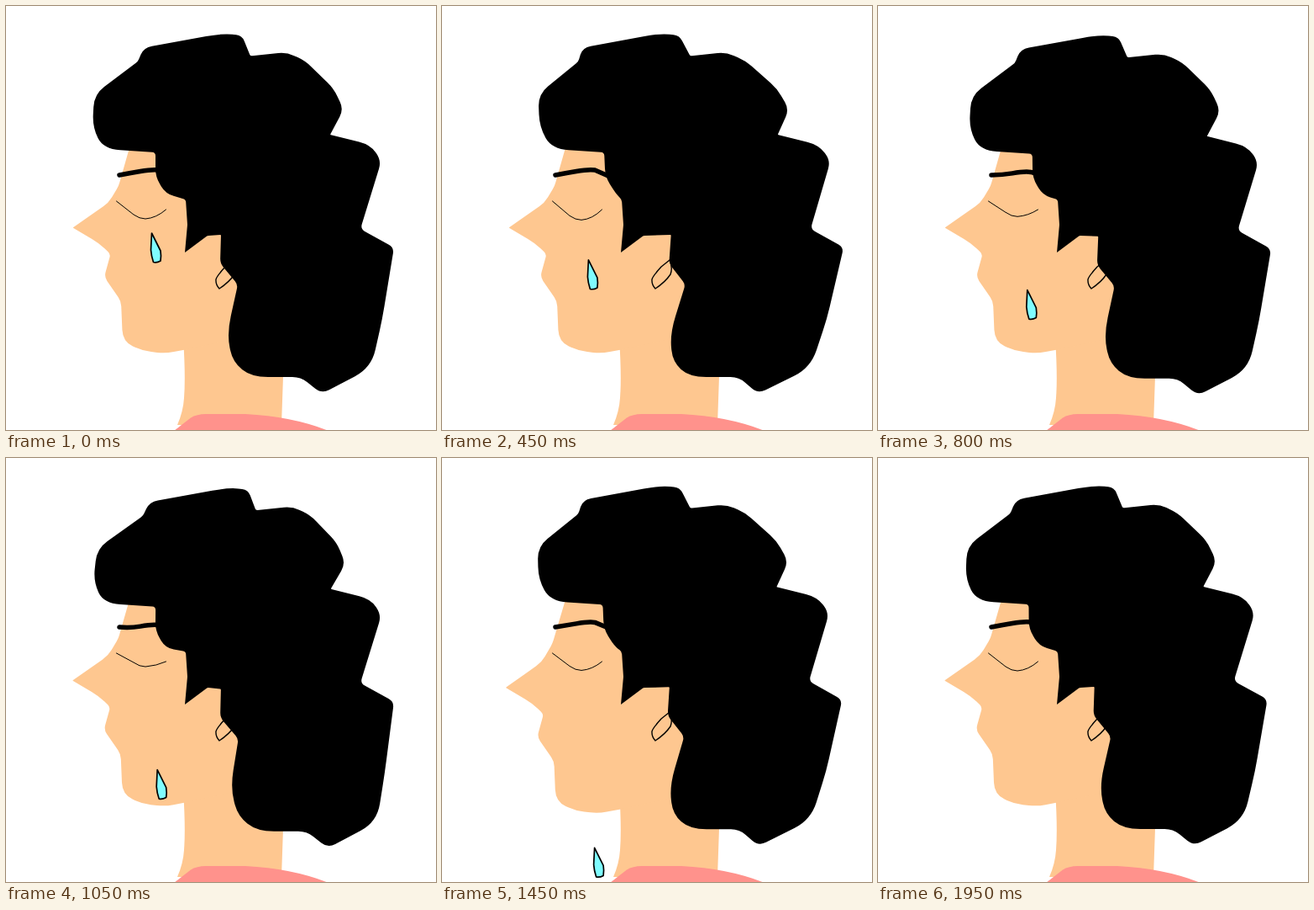
An HTML page for the animation above (2000 ms loop, 512 px wide and 504 px high).

```html
<!DOCTYPE html>
<html lang="en">
<head>
<meta charset="utf-8">
<title>Crying profile</title>
<style>
  html, body { margin: 0; width: 100%; height: 100%; overflow: hidden; background: #fff; }
  svg { display: block; width: 512px; height: 504px; }
  .skin { fill: #fec790; }
  .line { fill: none; stroke: #000; stroke-linejoin: round; stroke-linecap: round; }
</style>
</head>
<body>
<svg viewBox="0 0 512 504">
  <path class="skin" d="M211 395 Q214 440 212 466 Q211 482 204 498 H328 L330 440 V300 H240 Z"/>
  <path class="skin" id="face"/>
  <path fill="#ff928c" d="M200 505 L220 489.5 Q227 485 238 485 H285 Q342 488 384 505 Z"/>
  <path class="line" id="eye" stroke-width="1"/>
  <path class="line" id="brow" stroke-width="5.5"/>
  <path class="line" stroke-width="1.4" d="M271 302 L261 310 Q251 321 250 325 Q249.5 331 254 336 Q266 328 272 319 Q275 311 271 302 Z"/>
  <path id="tear" fill="#7ffcff" stroke="#000" stroke-width="1.7" stroke-linejoin="round"
    d="M0 1 L10.5 22 Q11.5 28 10.5 34 Q6 36.5 2 35.5 Q-0.5 28 -1 21 Z"/>
  <path id="hair"/>
</svg>
<script>
const LOOP = 2000, TICK = 50, KEY = 500, ROUND = 10;

// corners: x, y and, where it is not ROUND, the corner radius
const curls = [
  [190, 223], [178, 203], [178, 174, 4], [116, 170, 20], [103, 144, 15], [105, 105, 15],
  [157, 66, 3], [164, 49.5], [258, 32.5, 20], [281, 35, 7], [291, 59.5, 2],
  [334, 55], [356, 65], [390, 98], [402, 123], [386, 153, 1],
  [434, 165, 14], [447, 184], [422, 265, 6], [462, 287, 7],
  [448, 372, 15], [435, 430, 22], [376, 461], [351, 441],
  [292, 441, 20], [270, 423, 14], [263, 390, 22], [276, 331, 5], [255, 306, 6], [256, 272, 1]
];
const sideburn = [[240, 273, 1], [213, 293, 0], [216, 260, 1], [214, 230, 3]];
const profile = [
  [148, 165, 0], [134, 214, 4], [122, 234, 8], [79.5, 263.5, 1], [111, 282], [124.5, 295, 4],
  [117, 322, 6], [137, 351, 6], [139, 399, 14], [163, 410], [190, 413], [216, 408, 1],
  [300, 390, 0], [300, 165, 0]
];

const byId = id => document.getElementById(id);
const hair = byId('hair'), face = byId('face'), eye = byId('eye');
const brow = byId('brow'), tear = byId('tear');

// linear value between keys set every half second
function tween(keys, t) {
  const i = Math.floor(t / KEY), k = t / KEY - i;
  return keys[i] + (keys[i + 1] - keys[i]) * k;
}

// point at most r away from a towards b
function along(a, b, r) {
  const len = Math.hypot(b[0] - a[0], b[1] - a[1]);
  const k = Math.min(r / len, 0.5);
  return [a[0] + (b[0] - a[0]) * k, a[1] + (b[1] - a[1]) * k];
}

function rounded(points) {
  const n = points.length;
  return points.map((p, i) => {
    const r = p[2] ?? ROUND;
    const from = along(p, points[(i + n - 1) % n], r);
    const to = along(p, points[(i + 1) % n], r);
    return `${i ? 'L' : 'M'}${from} Q${p[0]} ${p[1]} ${to}`;
  }).join(' ') + 'Z';
}

// the middle of the hair swings back most; crown and tips slide when it sinks
function moveCurl([x, y, r], sweep, sink) {
  const belly = Math.sin(Math.PI * (y - 22) / 440);
  const slide = 10 * (1 - belly ** 2) ** 2 - 2;
  return [x + 19 * belly * sweep + slide * sink, y + 3 * sink, r];
}

// the face drops fully below the brow and stays put at the hairline
function moveFace([x, y, r], drop) {
  const k = drop * Math.min(1, (y - 165) / 75);
  return [x - 4 * k, y + 10.5 * k, r];
}

function draw(t) {
  const sweep = tween([0, 1, 0, 0.9, 0], t);
  const sink = tween([0, 0, 1, 0, 0], t);
  const drop = tween([0, 0, 0, 1, 0], t);

  const moved = curls.map(p => moveCurl(p, sweep, sink));
  hair.setAttribute('d', rounded([...moved, ...sideburn]));
  face.setAttribute('d', rounded(profile.map(p => moveFace(p, drop))));

  const lid = 253 + tween([0, 1.5, -5.5, 0, 0], t);
  eye.setAttribute('d', `M131.5 232 L152 ${lid - 5} Q159 ${lid} 166 ${lid} Q179 ${lid - 1} 190.5 242`);

  const arch = 194.5 + 4 * sink;
  brow.setAttribute('d', `M135 201 Q148 ${arch + 4} 160 ${arch + 2} Q174 ${arch - 0.5} 182 ${arch + 0.5} L198 202`);

  const x = tween([173.5, 174.5, 180, 181.8, 182], t);
  const y = tween([269, 304.5, 358, 474, 534], t);
  tear.setAttribute('transform', `translate(${x} ${y})`);
}

const start = performance.now();
function loop() {
  const t = (performance.now() - start) % LOOP;
  draw(Math.floor(t / TICK) * TICK);
  requestAnimationFrame(loop);
}
loop();
</script>
</body>
</html>
```
